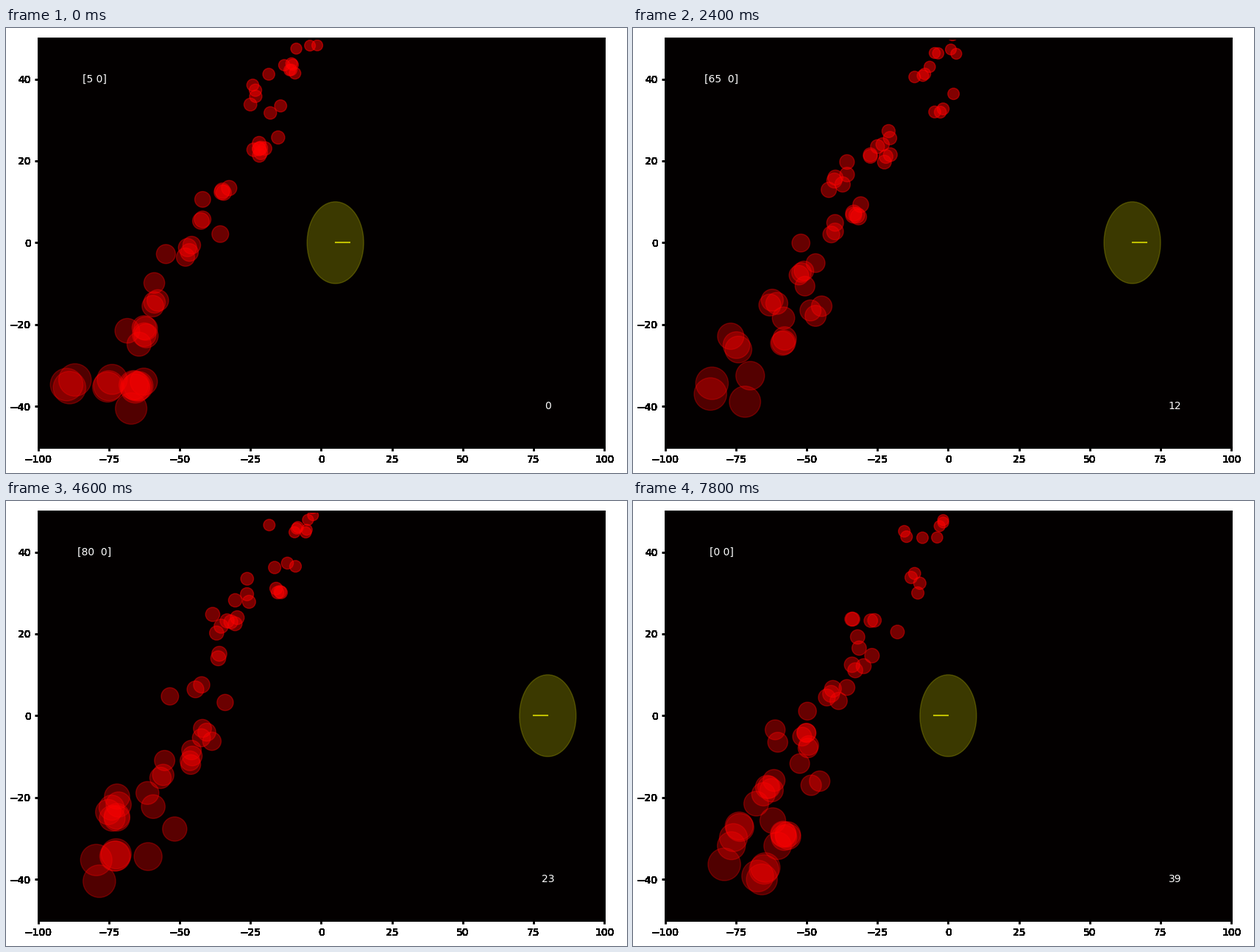
These frames come from a looping animation (844 px wide and 606 px high, 8000 ms). A matplotlib script:

```python
import numpy as np
import matplotlib.pyplot as plt
from matplotlib.animation import FuncAnimation
from matplotlib.patches import Circle

W, H, DPI = 844, 606, 100
LEFT, RIGHT, TOP, BOTTOM = 43.55, 813.3, 13.8, 570.9
FRAMES, STEP = 40, 200
DOTS, CLUMPS = 62, 44
INK_LAYERS = 30

plt.rcParams["font.family"] = "DejaVu Sans"
fig = plt.figure(figsize=(W / DPI, H / DPI), dpi=DPI, facecolor="white")
ax = fig.add_axes([LEFT / W, 1 - BOTTOM / H,
                   (RIGHT - LEFT) / W, (BOTTOM - TOP) / H])
ax.set_xlim(-100, 100)
ax.set_ylim(-50, 50)
ax.set_xticks(range(-100, 101, 25))
ax.set_yticks(range(-40, 41, 20))
ax.set_facecolor("#030000")

# Heavy frame and ticks; the labels get their weight from repeated printing.
ax.tick_params(width=2.1, labelbottom=False, labelleft=False)
for spine in ax.spines.values():
    spine.set_linewidth(2.1)


def print_label(x, y, value, layout):
    transform, va, ha = layout
    label = str(value).replace("-", "\N{MINUS SIGN}")
    for _ in range(INK_LAYERS):
        ax.text(x, y, label, transform=transform, va=va, ha=ha, fontsize=10)


for v in range(-100, 101, 25):
    print_label(v, 0, v, ax.get_xaxis_text1_transform(7))
for v in range(-40, 41, 20):
    print_label(0, v, v, ax.get_yaxis_text1_transform(7))

dots = ax.scatter([], [], linewidths=1)
disc = ax.add_patch(Circle((5, 0), 10, color="y", alpha=0.3, zorder=2))
heading, = ax.plot([], [], color="y", lw=1.5, zorder=2.2)
style = dict(color="white", fontsize=10, ha="center", va="center", zorder=4)
place = ax.text(-80, 40, "", **style)
count = ax.text(80, -40, "", **style)


def scatter_dots(k):
    """Loose clumps along a slanting band, larger and fainter lower down."""
    rng = np.random.default_rng(300 + k)
    strata = (np.arange(CLUMPS) + rng.random(CLUMPS)) / CLUMPS
    side = np.clip(rng.normal(0, 1, CLUMPS), -2.1, 2.1)
    pick = np.sort(rng.integers(0, CLUMPS, DOTS))

    t = 1.07 * strata[pick] - 0.04
    spread = 4 + 2 * t
    across = spread * side[pick] + rng.normal(0, 1.0, DOTS)
    along = t + rng.normal(0, 0.011, DOTS)
    x = -1 - 76 * along + across
    y = 50 - 88 * along - 0.45 * across

    radius = 8 / (1 - 0.65 * np.clip(t, 0, 1)) - 0.7
    colors = np.zeros((DOTS, 4))
    colors[:, 0] = 1
    colors[:, 3] = 0.52 - 0.21 * np.clip(t, 0, 1)
    dots.set_offsets(np.column_stack([x, y]))
    dots.set_sizes((2 * radius * 72 / DPI) ** 2)
    dots.set_color(colors)


def update(k):
    x = 100 - 5 * abs(k - 19)
    speed = 5 if k < 19 else -5
    scatter_dots(k)
    disc.center = (x, 0)
    heading.set_data([x, x + speed], [0, 0])
    place.set_text(str(np.array([x, 0])))
    count.set_text(str(k))
    return dots, disc, heading, place, count


anim = FuncAnimation(fig, update, frames=FRAMES, interval=STEP,
                     repeat=True, repeat_delay=0, blit=False)
plt.show()
```
